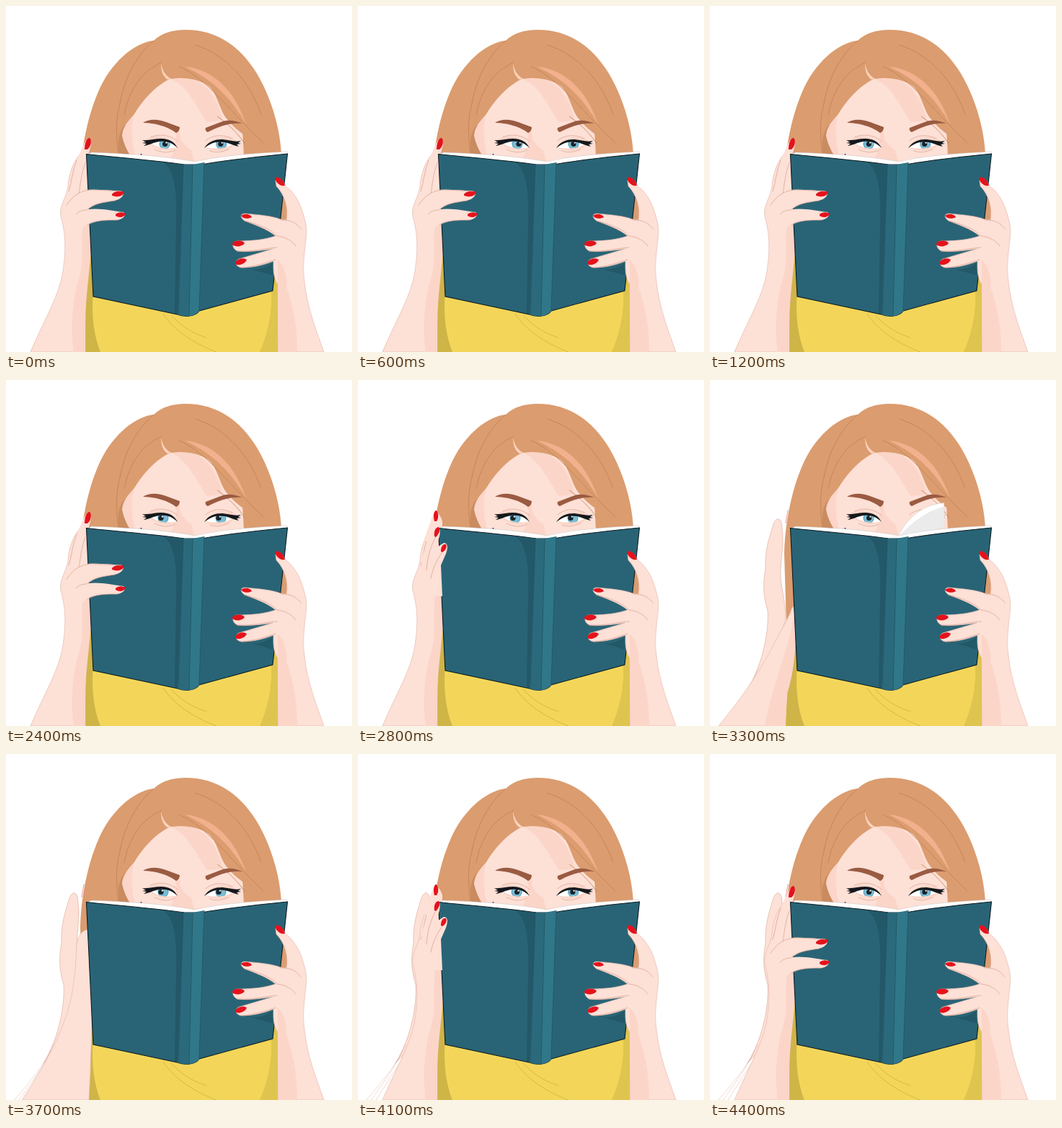
These frames come from a looping animation (480x480 px, 4500 ms). An HTML page:

```html
<!DOCTYPE html>
<html lang="en">
<head>
<meta charset="utf-8">
<title>Reading</title>
<style>
  html, body { margin: 0; width: 100%; height: 100%; overflow: hidden; background: #fff; }
  svg { display: block; width: 100vw; height: 100vh; }
  .hair { fill: #db9c6f; }
  .skin { fill: #fde0d6; }
  .shade { fill: #fbd5c8; }
  .nail { fill: #e3131d; }
  .strand { fill: none; stroke: #c18154; stroke-width: .8; }
  .crease { fill: none; stroke: #dba79a; stroke-width: .8; stroke-linecap: round; }
  .brow { fill: #9a5b42; }
  .ink { fill: #15181c; }
  .trail { fill: none; stroke: #d9a99c; stroke-width: .7; stroke-dasharray: 1.5 1; }
</style>
</head>
<body>
<svg viewBox="0 0 480 480">
  <defs>
    <clipPath id="leftEye"><path d="M202 191C210 183 228 182 237 196C228 199 212 198 202 191Z"/></clipPath>
    <clipPath id="rightEye"><path d="M277 196C286 184 306 183 316 191C306 198 290 199 277 196Z"/></clipPath>
    <g id="iris">
      <circle r="7.5" fill="#4f94b0"/>
      <circle r="6.6" fill="#79bdd4"/>
    </g>
    <g id="pupil">
      <circle r="3.6" fill="#17232c"/>
      <circle cx="1.8" cy="-1.8" r="1.1" fill="#fff"/>
    </g>
  </defs>

  <!-- hair and face -->
  <path class="hair" d="M106 342L103 240C104 194 115 149 128 119C144 81 176 51 205 48C215 38 231 33 249 33C294 33 325 57 347 92C366 123 380 166 382 205L392 300L360 320L130 320Z"/>
  <path fill="#c98b60" d="M157 207C154 190 156 176 164 166L176 158L172 207Z"/>
  <path class="shade" d="M178 150C170 159 162 167 161 180C163 190 167 199 172 207H186L184 160Z"/>
  <path class="skin" d="M228 101C208 110 190 130 178 150C173 162 174 190 179 208L262 220L330 207L328 172C294 157 306 125 280 110C267 101 246 98 228 101Z"/>
  <path class="shade" d="M229 101C253 112 263 138 279 161L301 159C294 133 283 108 254 100Z"/>
  <path class="shade" d="M233 168C238 182 236 195 229 211L262 218L257 200C246 193 239 184 241 170Z"/>
  <path class="hair" d="M228 101C247 98 268 101 280 110C293 120 295 141 305 155C317 171 340 188 360 193L375 190L352 120L280 80Z"/>
  <path fill="#f3b08d" d="M248 84C288 88 318 118 333 164C316 134 293 105 248 84Z"/>
  <path fill="#fbd3bb" d="M215 79C217 91 222 97 229 101L224 102C217 97 215 89 215 79Z"/>
  <path class="strand" d="M205 48C188 62 166 91 158 135C153 154 152 174 156 205M216 78C188 91 171 115 164 151M262 54C306 67 339 106 354 151M240 84C279 101 302 137 357 190M293 153C310 165 323 178 331 191"/>

  <!-- eyes -->
  <path class="brow" d="M190 162C199 156 212 157 222 161L241 168C241 172 239 175 236 176C224 167 206 162 190 162Z"/>
  <path class="brow" d="M277 169L298 161C308 157 318 159 328 163C311 161 293 168 280 175C277 174 276 171 277 169Z"/>
  <path class="shade" d="M193 186C206 177 229 180 238 195C225 205 205 199 193 186ZM275 196C286 179 310 179 321 188C311 203 290 204 275 196Z"/>
  <g clip-path="url(#leftEye)">
    <path fill="#fff" d="M200 180H240V200H200Z"/>
    <use id="irisL" href="#iris"/><use id="pupilL" href="#pupil"/>
  </g>
  <g clip-path="url(#rightEye)">
    <path fill="#fff" d="M274 180H320V200H274Z"/>
    <use id="irisR" href="#iris"/><use id="pupilR" href="#pupil"/>
  </g>
  <path class="ink" d="M189 186C199 187 206 184 215 184C227 184 234 189 238 197C231 190 223 187 213 188C205 189 199 193 191 194L195 191L189 190L194 189Z"/>
  <path class="ink" d="M275 197C281 188 289 185 300 185C310 186 317 189 326 187L322 190L326 191L320 192L323 195C316 194 310 190 303 189C292 187 284 190 275 197Z"/>
  <path class="crease" d="M201 182C214 176 230 180 238 188M277 187C287 178 302 178 314 184M206 199C217 204 226 204 234 200M283 201C290 204 299 203 309 199"/>
  <circle class="ink" cx="187.5" cy="206" r=".9"/>

  <g id="page">
    <path id="sheet" fill="#fff" stroke="#d2d2d2" stroke-width=".6"/>
    <path id="sheetShade" fill="#ebebeb"/>
  </g>

  <!-- sweater -->
  <path fill="#f3d659" d="M118 340L108 410L105 480H378V360Z"/>
  <path fill="#cfb448" d="M118 340L108 410L105 480H131C122 458 118 428 121 396Z"/>
  <path fill="#dfc44f" d="M367 390C371 419 364 453 352 480H378V360Z"/>
  <path fill="none" stroke="#d6b944" d="M218 427C232 449 260 468 292 480M229 429C247 448 263 455 278 460"/>

  <!-- left arm -->
  <g id="ghost">
    <path class="skin" stroke="#dfb3a6" stroke-width=".7" d="M52 429C74 394 82 345 80 320C74 300 73 285 77 262C76 240 80 225 88 200C92 189 100 190 100 207C104 229 95 259 99 283C102 304 107 320 104 336C92 368 75 407 52 429Z"/>
    <path class="trail" d="M12 480C34 453 49 437 62 411M18 480C40 450 55 429 66 402M25 480C46 447 56 432 69 409"/>
    <path d="M108 181L105 199" stroke="#d9343c" stroke-dasharray="1 1"/>
  </g>
  <path id="arm" class="skin" stroke="#e6bcb0" stroke-width=".7"/>
  <path id="reachShade" class="shade" d="M118 322C110 370 88 418 76 480H104L107 435C116 405 118 380 119 350Z"/>
  <g id="armShade">
    <path class="shade" d="M109 280C101 323 112 350 99 386C91 420 90 449 94 480H110V440C110 400 116 370 118 335L116 280Z"/>
    <path class="crease" d="M110 218C104 233 103 250 101 262M98 214C91 233 91 246 87 257"/>
  </g>
  <g id="restIndex">
    <path class="skin" d="M99 211L109 190C113 182 119 184 118 192L113 212Z"/>
    <path class="nail" d="M109 199C109 190 112 183 116 183C120 187 117 196 113 199Z"/>
  </g>
  <g id="liftIndex">
    <path class="skin" d="M91 223L104 187C107 181 113 183 117 196L117 207L108 224Z"/>
    <path class="nail" d="M106 196C104 188 105 181 109 181C112 185 112 192 109 196Z"/>
  </g>

  <!-- book -->
  <path fill="#fff" stroke="#bbb" stroke-width=".4" d="M112 206L119 203C171 205 220 208 262 216C300 207 350 204 390 202L389 209L262 224Z"/>
  <path fill="#296476" stroke="#0d1c22" stroke-width="1.1" d="M111.500 205.500C155 210 205 214 248 220H271C310 213 351 209 390.500 205L370 395L268 423C263 431 248 432 238 428L121 403Z"/>
  <path fill="#235868" d="M218 217C236 228 237 266 236 301L234 426L242 429L247 220ZM327 361C343 369 360 365 371 355L370 374Z"/>
  <path fill="#2a6a7c" d="M246 220H260L255 430C249 431 243 430 238 428Z"/>
  <path fill="#307789" d="M259 220L275 217L268 423C264 428 259 430 254 430Z"/>
  <path fill="none" stroke="#1d5160" stroke-width=".7" d="M246 220L239 428M259 220L254 430M275 217L268 423"/>

  <!-- left fingers -->
  <g id="fingers">
    <path class="skin" d="M78 287C86 270 97 257 114 255C130 254 147 256 161 257C166 261 160 268 151 270C132 273 124 274 114 282C131 280 148 284 163 286C168 290 162 296 154 297C138 297 126 297 113 303L92 320Z"/>
    <path class="nail" d="M147 261C151 256 160 256 164 258C163 264 154 266 147 263ZM152 289C156 285 163 286 166 288C164 294 156 294 152 291Z"/>
    <path class="crease" d="M84 276C94 262 104 255 121 255L160 257M151 270C132 273 121 274 112 283C105 283 101 285 97 289M154 297C137 297 124 297 113 304"/>
  </g>
  <g id="tips">
    <path class="skin" d="M88 249C94 231 99 217 107 204C113 201 115 208 113 217L108 233L119 226C125 226 125 233 122 241L115 257L117 300L90 300Z"/>
    <path class="nail" d="M106 217C105 209 108 204 112 204C115 208 112 214 108 218ZM115 238C115 231 118 227 122 228C124 232 121 237 117 239Z"/>
    <path class="crease" d="M107 219C98 237 96 251 95 264M116 240C109 251 104 260 101 275"/>
  </g>

  <!-- right hand -->
  <path class="skin" stroke="#e6bcb0" stroke-width=".7" d="M374 242C376 237 384 239 387 249C403 260 411 280 415 299C421 318 409 347 414 382C418 420 430 448 441 480H377.500L377 386C370 376 371 362 371 354C358 359 343 363 327 363C319 362 316 355 323 351L370 337C354 339 335 342 321 340C313 336 313 328 320 326C343 326 359 324 374 319C362 309 344 303 331 298C324 293 325 288 332 288C353 290 368 291 381 296L389 297C392 281 387 262 375 250Z"/>
  <path class="shade" d="M377 352C387 361 390 378 389 390C400 421 404 450 404 480H377.500L377 382Z"/>
  <path class="nail" d="M373 239C376 235 385 239 387 249C382 251 375 246 373 239ZM326 291C331 287 340 289 341 293C336 296 328 295 326 291ZM314 329C319 324 329 325 331 329C328 334 318 335 314 331ZM318 356C321 350 330 349 334 352C332 358 322 361 318 358Z"/>
  <path class="crease" d="M331 298C350 303 365 308 376 319C389 321 396 325 402 333M321 340C344 341 359 336 376 335M327 363C348 361 361 356 374 352M382 297C394 296 403 301 409 309"/>
</svg>
<script>
const LOOP = 4500;
const el = id => document.getElementById(id);
const show = (id, on) => el(id).style.display = on ? '' : 'none';
const lerp = (a, b, k) => a + (b - a) * k;
const ramp = (t, from, to) => Math.min(1, Math.max(0, (t - from) / (to - from)));

// Three arm poses sharing one path structure: holding, halfway, reaching behind the book.
const ARM = [
  'M34 480C55 430 76 400 80 360C84 330 81 310 76 292C73 278 84 266 86 250C87 230 96 210 108 200L116 206L118 335C116 370 110 400 110 440L110 480Z',
  'M22 480C55 430 80 385 90 340C95 315 96 300 97 285C98 270 98 262 100 255C104 248 108 244 113 244L116 250L119 350C120 380 118 400 117 440L115 480Z',
  'M12 480C45 440 75 395 92 360C100 345 104 338 108 330C110 326 112 322 113 318C114 315 115 315 116 314L117 318L119 350C118 380 116 405 107 435L104 480Z'
];

function blend(a, b, k) {
  const target = b.match(/\d+/g);
  let i = 0;
  return a.replace(/\d+/g, n => lerp(+n, +target[i++], k).toFixed(1) + ' ');
}

function armPath(reach) {
  const i = Math.min(1, Math.floor(reach));
  return blend(ARM[i], ARM[i + 1], reach - i);
}

function drawEyes(t) {
  let look = 0.7;
  if (t >= 600 && t < 2400) look = lerp(1, 0, (t - 600) / 1800);
  else if ((t >= 2400 && t < 3000) || (t >= 3600 && t < 4000)) look = 0;
  const place = (id, x) => el(id).setAttribute('transform', `translate(${x} 191.5)`);
  place('irisL', lerp(218, 221, look));
  place('irisR', lerp(298, 299, look));
  place('pupilL', lerp(215, 223, look));
  place('pupilR', lerp(295, 299, look));
}

function drawPage(t) {
  show('page', t >= 3000 && t < 3500);
  const angle = lerp(2.7, -0.5, ramp(t, 3000, 3500));
  const x = 262 + 88 * Math.cos(angle);
  const y = 212 - 59 * Math.sin(angle);
  const bend = lerp(262, x, 0.3);
  const foot = Math.max(y + 20, 204);
  const sheet = inset => `M260 219Q${bend + inset} ${y + 4 + inset} ${x} ${y + inset / 2}V${foot}L262 220Z`;
  el('sheet').setAttribute('d', sheet(0));
  el('sheetShade').setAttribute('d', sheet(10));
}

function drawArm(t) {
  const reach = t < 3600 ? 2 * ramp(t, 2900, 3200) : 2 - ramp(t, 3400, 3600) - ramp(t, 3800, 4000);
  const open = t < 4000 ? ramp(t, 2400, 2800) : 1 - ramp(t, 4000, 4300);
  const holding = reach < 0.05;
  const lifted = open >= 0.5;
  el('arm').setAttribute('d', armPath(reach));
  el('fingers').setAttribute('transform', `translate(${100 * open} 0) scale(${1 - open} 1)`);
  show('fingers', holding && !lifted);
  show('restIndex', holding && !lifted);
  show('liftIndex', holding && lifted);
  show('tips', holding && lifted);
  show('armShade', holding);
  show('reachShade', reach > 1.5);
  show('ghost', t >= 3000);
}

function frame(now) {
  const time = now % LOOP;
  const step = time < 2400 ? 300 : 100;
  const t = Math.floor(time / step) * step;
  drawEyes(t);
  drawPage(t);
  drawArm(t);
  requestAnimationFrame(frame);
}
requestAnimationFrame(frame);
</script>
</body>
</html>
```
